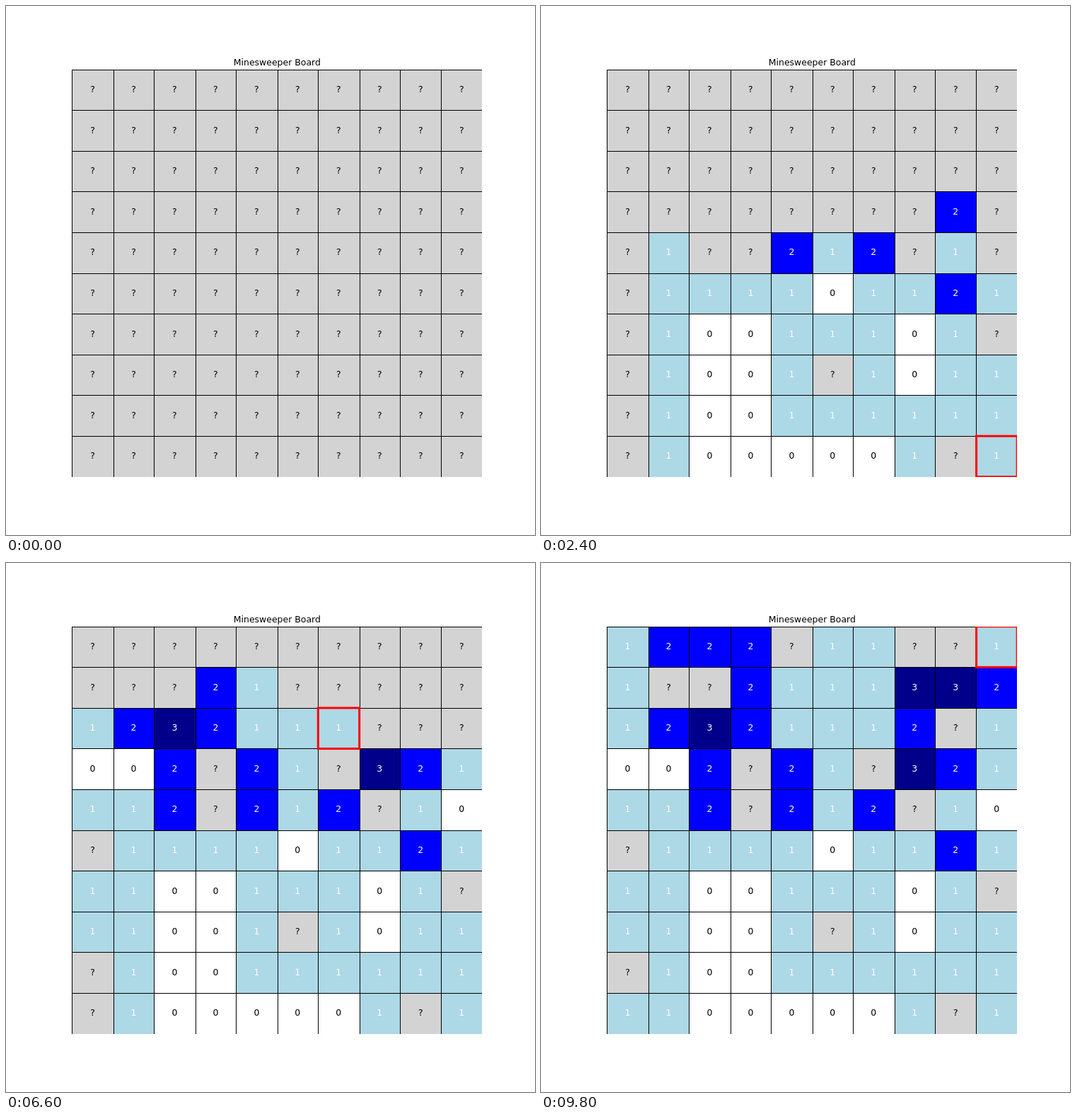
An HTML page for the animation above (10000 ms loop, 748 by 748 pixels).

```html
<!DOCTYPE html>
<html lang="en">
<head>
<meta charset="utf-8">
<title>Minesweeper Board</title>
<style>
  html, body { margin: 0; width: 100%; height: 100%; overflow: hidden; background: #fff; }
  svg { display: block; width: 748px; height: 748px; }
  text { font: 12.47px "DejaVu Sans", sans-serif; text-anchor: middle; }
</style>
</head>
<body>
<svg viewBox="0 0 748 748">
  <clipPath id="axes"><rect x="93" y="90" width="580" height="576"/></clipPath>
  <text x="383.35" y="83.5">Minesweeper Board</text>
  <g clip-path="url(#axes)">
    <g id="cells" shape-rendering="crispEdges"></g>
    <path id="grid" stroke="#000" fill="none" shape-rendering="crispEdges"/>
    <rect id="mark" fill="none" stroke="red" stroke-width="2.992"/>
  </g>
  <g id="labels"></g>
</svg>
<script>
const LOOP = 10000, STEP = 200, N = 10, SCALE = 0.748;

// Mines are marked with *
const board = [
  '1222*11**1', '1**2111332', '12321112*1', '002*21*321', '112*212*10',
  '*111101121', '110011101*', '11001*1011', '*100111111', '11000001*1'
];

// Runs of clicks (row, column), one every STEP ms from the given time
const runs = [
  [200, '83 65 55 77 48 59'],
  [1600, '38 79 41 89 99 37'],
  [3000, '49'],
  [3800, '42 32 40 60 30 34 23'],
  [5400, '25 24 35 13 14 70 26 15 90 27 16 17 29 19 10 01 18 05 00 02 03 06 09']
];

const fills = { '?': '#d3d3d3', 0: '#fff', 1: '#add8e6', 2: '#00f', 3: '#00008b' };
const $ = id => document.getElementById(id);

function add(parent, tag, attrs) {
  const el = document.createElementNS('http://www.w3.org/2000/svg', tag);
  for (const k in attrs) el.setAttribute(k, attrs[k]);
  return parent.appendChild(el);
}

// Edge positions at full plot size
const edgeX = c => 125 + 77.5 * c;
const edgeY = r => 120 + 77 * r;
const pixel = v => Math.floor((Math.round(v) + 0.5) * SCALE);

const cells = [];
let lines = '';
for (let r = 0; r < N; r++) {
  const y = pixel(edgeY(r)), x0 = pixel(edgeX(r));
  lines += `M93 ${y + 0.5}H673M${x0 + 0.5} 90V666`;
  for (let c = 0; c < N; c++) {
    const x = pixel(edgeX(c));
    const box = add($('cells'), 'rect', {
      x, y, width: pixel(edgeX(c + 1)) - x, height: pixel(edgeY(r + 1)) - y
    });
    const label = add($('labels'), 'text', {
      x: edgeX(c + 0.5) * SCALE, y: edgeY(r + 0.5) * SCALE + 3.44
    });
    cells.push({ box, label, value: board[r][c], openAt: Infinity });
  }
}
$('grid').setAttribute('d', lines);

// Opening a zero also opens everything around it
function open(r, c, time) {
  if (r < 0 || c < 0 || r >= N || c >= N) return;
  const cell = cells[r * N + c];
  if (cell.openAt <= time) return;
  cell.openAt = time;
  if (cell.value !== '0') return;
  for (let i = -1; i <= 1; i++)
    for (let j = -1; j <= 1; j++) open(r + i, c + j, time);
}

const clicks = [];
for (const [start, list] of runs) {
  list.split(' ').forEach((rc, i) => {
    const click = { r: +rc[0], c: +rc[1], time: start + i * STEP };
    clicks.push(click);
    open(click.r, click.c, click.time);
  });
}

function draw(t) {
  for (const { box, label, value, openAt } of cells) {
    const text = t >= openAt ? value : '?';
    box.setAttribute('fill', fills[text]);
    label.textContent = text;
    label.setAttribute('fill', text > 0 ? '#fff' : '#000');
  }
  const last = clicks.filter(k => k.time <= t).pop();
  const mark = $('mark');
  mark.setAttribute('visibility', last ? 'visible' : 'hidden');
  if (!last) return;
  const { r, c } = last;
  const x = Math.round(edgeX(c)), y = edgeY(r);
  mark.setAttribute('x', x * SCALE);
  mark.setAttribute('y', y * SCALE);
  mark.setAttribute('width', (Math.round(edgeX(c + 1)) - x) * SCALE);
  mark.setAttribute('height', 77 * SCALE);
}

let shown = -1;
function tick() {
  const step = Math.floor(performance.now() % LOOP / STEP);
  if (step !== shown) draw((shown = step) * STEP);
  requestAnimationFrame(tick);
}
tick();
</script>
</body>
</html>
```
